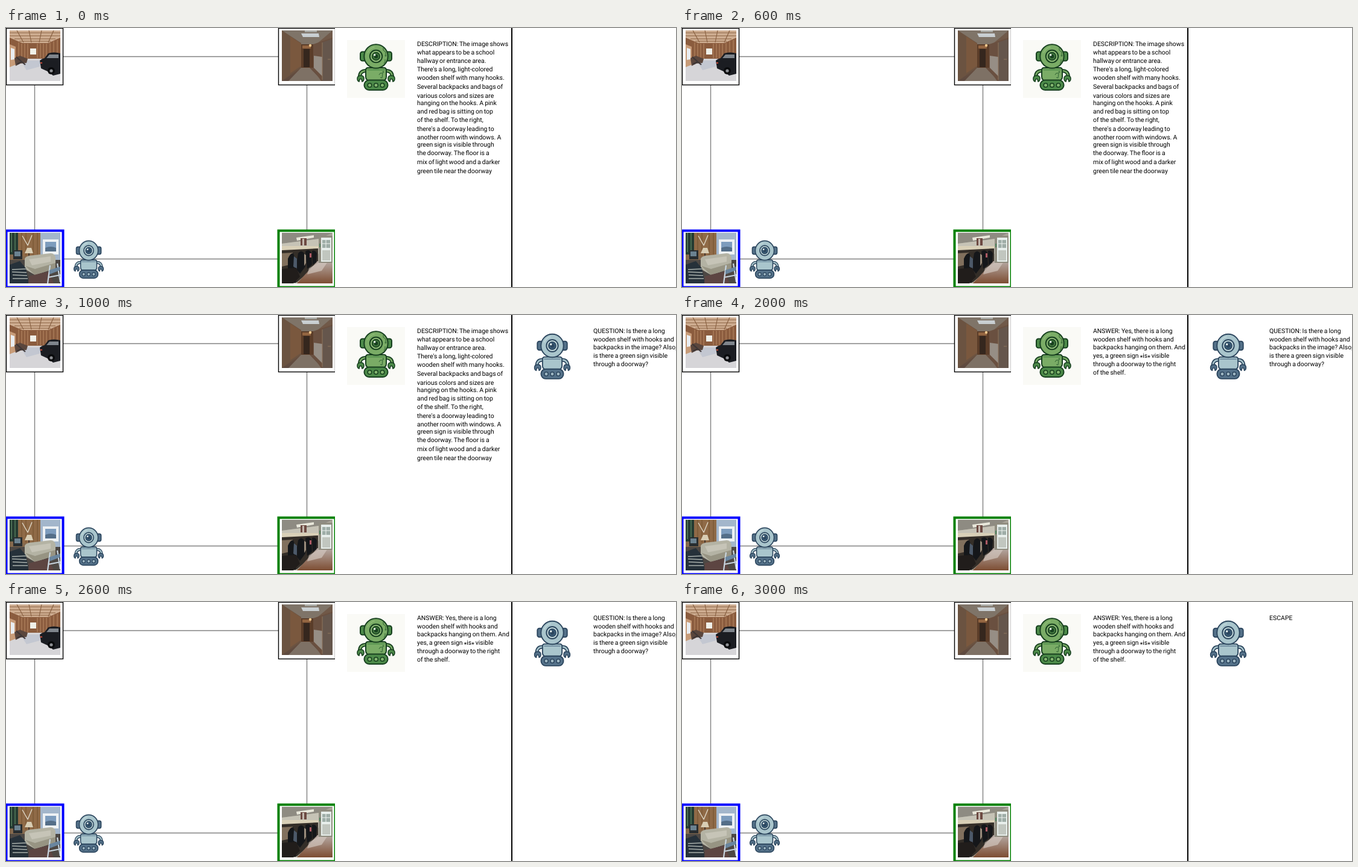
Animation, 1110 px wide and 430 px high, one loop 4 s. Source, as an HTML page:

```html
<!DOCTYPE html>
<html lang="en">
<head>
<meta charset="utf-8">
<title>Robot dialogue</title>
<style>
  html, body { margin: 0; width: 100%; height: 100%; overflow: hidden; background: #fff; }
  svg { display: block; }
  text { font: 10.5px Roboto, "Liberation Sans", sans-serif; word-spacing: -.6px; fill: #000; text-rendering: geometricPrecision; white-space: pre; }
  .blue { --line: #2c465e; --main: #a9c5cc; --soft: #c3d9dc; --limb: #55728a; --iris: #395a75; --dot: #9db6c2; }
  .green { --line: #17401f; --main: #7aac66; --soft: #8fbc78; --limb: #4c8a49; --iris: #40743d; --dot: #83b56f; }
</style>
</head>
<body>
<svg width="1110" height="430" viewBox="0 0 1110 430">
  <defs>
    <clipPath id="pic"><rect width="84" height="84"/></clipPath>
    <clipPath id="map"><rect width="545" height="430"/></clipPath>
    <filter id="soft" x="0" y="0" width="1" height="1"><feGaussianBlur stdDeviation=".7"/></filter>
    <linearGradient id="hall" x2="0" y2="1">
      <stop stop-color="#6f5b4d"/><stop offset=".5" stop-color="#74543d"/><stop offset="1" stop-color="#5d4a40"/>
    </linearGradient>
    <linearGradient id="floor" x2="0" y2="1">
      <stop stop-color="#b6aaa4"/><stop offset="1" stop-color="#7d4d33"/>
    </linearGradient>

    <!-- centred on the head -->
    <g id="robot" stroke="var(--line)" stroke-width="2" stroke-linejoin="round" stroke-linecap="round">
      <g id="arm">
        <path d="M-17 24q-9 0-10 9" fill="none" stroke-width="6"/>
        <path d="M-17 24q-9 0-10 9" fill="none" stroke="var(--main)" stroke-width="2.6"/>
        <path d="M-25 32q-6 0-6 5 0 4 3 5l1-4q2-1 3 0l1 4q3-1 3-5 0-5-5-5z" fill="var(--limb)" stroke-width="1.6"/>
      </g>
      <use href="#arm" transform="scale(-1 1)"/>
      <path d="M-13 19H13Q17 19 17 23V34Q17 40 11 40H-11Q-17 40-17 34V23Q-17 19-13 19z" fill="var(--main)"/>
      <path d="M-14 22.5H14" stroke="var(--limb)" stroke-width="1.3"/>
      <rect x="-19.5" y="39.5" width="39" height="16.5" rx="8" fill="var(--limb)"/>
      <g fill="var(--dot)" stroke-width="1.6">
        <circle cx="-10.5" cy="48" r="3.3"/><circle cy="48" r="3.3"/><circle cx="10.5" cy="48" r="3.3"/>
      </g>
      <rect x="-26" y="-7.5" width="10" height="15" rx="3.5" fill="var(--limb)"/>
      <rect x="16" y="-7.5" width="10" height="15" rx="3.5" fill="var(--limb)"/>
      <circle r="19.7" fill="var(--main)"/>
      <path d="M-14-6Q-10-14-3-15" fill="none" stroke="var(--soft)" stroke-width="1.6"/>
      <circle r="10.2" fill="var(--soft)"/>
      <circle r="6.4" fill="var(--iris)" stroke-width="1.6"/>
      <circle r="3.2" fill="var(--line)" stroke="none"/>
      <circle cx="-2.3" cy="-2.3" r="1.7" fill="#eef5f2" stroke="none"/>
    </g>

    <g id="garage">
      <path fill="#8b5c3e" d="M0 0H84V84H0z"/>
      <path fill="#cfae92" d="M0 0H84V12L64 21H21L0 12z"/>
      <path stroke="#8a6243" stroke-width="1.2" d="M0 4H84M0 9H84M8 14H76M16 18H68M12 0l11 20M32 0l4 20M53 0l-4 20M73 0l-9 20"/>
      <path stroke="#b98b67" d="M15 20V54M20 22V48M25 22V47M30 22V47M46 22V46M51 22V46M56 22V46M61 22V46M67 21V46M73 18V46M79 16V46"/>
      <path fill="#d6d5d8" d="M0 56L19 47H55L84 70V84H0z"/>
      <path fill="#c3c7d1" d="M18 50L52 50 50 60 28 66z"/>
      <path fill="#c79b78" d="M0 23L10 27V57L0 61z"/>
      <path fill="#e9edf1" d="M2 29L8 31V48L2 49z"/>
      <path fill="#f0f0e8" d="M34 30H44V40H34z"/>
      <path fill="#5a463d" d="M8 46L17 42 30 47 28 54 18 55 10 59z"/>
      <path fill="none" stroke="#3d3636" stroke-width="2" d="M11 44L20 52L26 57M12 56L20 52"/>
      <path fill="#1b1d22" d="M50 50Q53 47 58 46L64 38Q73 35 84 38V72L72 75 65 69 52 63z"/>
      <path fill="#7f858c" d="M61 46L66 40 81 40V46z"/>
      <circle cx="69" cy="67" r="6" fill="#090a0c"/><circle cx="69" cy="67" r="2.6" fill="#8d8f94"/>
      <path fill="#c64937" d="M51 53h3v2h-3z"/>
    </g>

    <g id="hallway">
      <path fill="url(#hall)" d="M0 0H84V84H0z"/>
      <path fill="#7f7468" d="M0 0H84L57 23H32z"/>
      <path fill="#c9cfd2" d="M32 5H61L62 11H35z"/>
      <path fill="#a8a9a4" d="M38 0H58V3H38z"/>
      <path fill="#6b5341" d="M0 0L32 21V62L0 84z"/>
      <path fill="#7a583e" d="M14 10L32 22V59L14 71z"/>
      <path fill="#5b3d29" d="M32 23H52V62H32z"/>
      <path fill="#936541" d="M34 25H48V30H34z"/>
      <path fill="#35271e" d="M36 31H46V61H36z"/>
      <path fill="#7e7165" d="M32 62H46L67 84H11z"/>
      <path fill="#6a5040" d="M52 23L84 12V84H65L52 65z"/>
      <path fill="#968e85" d="M53 42L67 44V76L53 62z"/>
      <path fill="#65564c" d="M67 20L84 14V84H67z"/>
      <path stroke="#8f745d" d="M67 20V82M76 48h5"/>
      <circle cx="47" cy="25" r="2.2" fill="#f1c88d"/>
    </g>

    <g id="lounge">
      <path fill="#84694e" d="M0 0H84V84H0z"/>
      <path fill="#253b32" d="M0 0H14V36H0z"/>
      <path stroke="#486b51" stroke-width="2" d="M3 0V32M9 0V32"/>
      <path fill="#8f6a47" d="M14 0H52V39H14z"/>
      <path stroke="#72502f" d="M20 0V38M27 0V38M39 0V38M46 0V38"/>
      <path fill="#a3b6cb" d="M51 0H84V51H51z"/>
      <path fill="#edf1f4" d="M55 11H81V36H55z"/>
      <path fill="#7d9cbd" d="M59 15H77V31H59z"/>
      <path fill="#546e88" d="M59 25q9-4 18 0v6H59z"/>
      <path fill="none" stroke="#ddd6c6" stroke-width="1.4" d="M21 5l9 16M37 4l-7 17"/>
      <path fill="#d8cdb4" d="M29 25h7l3 9H25z"/>
      <path stroke="#493b30" stroke-width="2" d="M32 34V42"/>
      <path fill="#282d30" d="M6 29H21V44H6z"/><path fill="#6b8290" d="M8 31H18V39H8z"/>
      <path fill="#4d4844" d="M0 45H84V84H0z"/>
      <path fill="#b4b3a4" d="M25 43Q27 39 33 38L68 34Q75 34 76 42V59L42 70 25 60z"/>
      <path fill="#c6c4b7" d="M32 44L68 39V48L37 54z"/>
      <path fill="#979483" d="M26 55L42 60 76 50V59L42 70z"/>
      <path fill="#26313a" d="M0 53L17 47 27 59 32 84H0z"/>
      <path stroke="#a9b0ac" stroke-width="1.5" d="M4 61L27 60M4 65L28 66M5 70L29 71M5 76L30 76"/>
      <path fill="#5d4542" d="M32 72L65 64 73 84H31z"/>
      <path fill="none" stroke="#c8d5df" stroke-width="2.2" d="M67 54L63 84M79 51L84 82M65 65L84 60M64 74L84 70"/>
      <path fill="#6a869f" d="M66 62L84 56V62L66 69z"/>
    </g>

    <g id="coats">
      <path fill="#aaa599" d="M0 0H84V84H0z"/>
      <path fill="#8e8b82" d="M0 0H84L62 10 0 18z"/>
      <path fill="#c6c3b6" d="M0 18L61 10V35L0 27z"/>
      <path fill="#e8e7da" d="M24 8L53 4V8L25 13z"/>
      <path fill="#6d4a42" d="M31 9h10v12H31z"/><path fill="#c5bab0" d="M34 10h3v11h-3z"/>
      <path fill="#d9d0b7" d="M0 22L62 22V26L0 30z"/>
      <path fill="#342e28" d="M0 29L60 26V52L25 82 0 84z"/>
      <path fill="#81705d" d="M0 34L18 33V52L0 56z"/>
      <path fill="url(#floor)" d="M25 84L59 47H84V84z"/>
      <path fill="#d6cbc4" d="M45 59L63 48H76L66 63 42 69z" opacity=".65"/>
      <path fill="#15171a" d="M10 43q4-10 9-9l7 21-3 28H10zM27 34q5-7 10 0l2 22-9 12-7-9zM39 31q6-5 10 2l1 20-8 7zM50 30q5-2 8 4l-1 15-6 4z"/>
      <path fill="#4c5969" d="M20 39l5 4v17l-6-4z"/><path fill="#9a8c7c" d="M37 35l3 2v13l-3 5z"/>
      <path fill="#ad5964" d="M46 34h3v7h-3z"/>
      <path fill="#908d80" d="M61 5H84V50H61z"/>
      <path fill="#e7eeeb" d="M65 8H82V48H65z"/>
      <path fill="#9eada7" d="M67 12H80V25H67z"/>
      <path stroke="#eff4f0" d="M73 11V26M67 18H80"/>
      <path fill="#c1c6bf" d="M67 29H80V46H67z"/>
      <path fill="#548763" d="M62 18h2v6h-2z"/>
      <path fill="#211d1b" d="M0 60L24 58 30 73 19 84H0z"/>
    </g>
  </defs>

  <rect width="1110" height="430" fill="#fff"/>
  <g clip-path="url(#map)">
    <path d="M47.5 47.5H498.5V383.5H47.5z" fill="none" stroke="#808080" stroke-width="1.4"/>
    <g id="rooms"></g>
    <use href="#robot" class="blue" transform="translate(137 369.5) scale(.79 .82)"/>
  </g>

  <rect x="565" y="20" width="96" height="96" fill="#fafaf6"/>
  <g class="green" transform="translate(613 47)">
    <use href="#robot"/>
    <g fill="none" stroke="#2f6333">
      <path d="M12-14v4l4 3v5M13 12l2-3v-4M5 31l2-3h4l-1 8M7 35l3 1"/>
      <circle cx="16" cy="-1" r="1"/><circle cx="12" cy="26" r="1"/>
    </g>
  </g>
  <rect x="837" width="2" height="430"/>
  <use id="asker" href="#robot" class="blue" transform="translate(905 51) scale(.95 .98)"/>
</svg>
<script>
const LOOP = 4000;
const svg = document.querySelector("svg");

function add(parent, tag, attrs) {
  const el = document.createElementNS("http://www.w3.org/2000/svg", tag);
  for (const key in attrs) el.setAttribute(key, attrs[key]);
  return parent.appendChild(el);
}

// A framed photo centred on a corner of the map.
function room(name, x, y, stroke, width) {
  const g = add(rooms, "g", { transform: `translate(${x} ${y})` });
  add(g, "rect", { x: -47, y: -47, width: 94, height: 94, fill: "#fff", stroke, "stroke-width": width });
  const photo = add(g, "g", { transform: "translate(-41.5 -43.5)", "clip-path": "url(#pic)" });
  add(photo, "use", { href: "#" + name, filter: "url(#soft)" });
}
room("garage", 47.5, 47.5, "#000", 1.4);
room("hallway", 497.5 + 1, 47.5, "#000", 1.4);
room("lounge", 47.5, 383.5, "#00f", 4);
room("coats", 498.5, 383.5, "#008000", 4);

// Lines are separated by "|"; asterisks sit at mid height.
function block(x, baselines, copy) {
  const group = add(svg, "g", {});
  copy.split("|").forEach((line, i) => {
    const text = add(group, "text", { x, y: baselines[i] });
    let low = 0;
    for (const part of line.split(/(\*)/)) {
      const drop = part === "*" ? 2.5 : 0;
      add(text, "tspan", { dy: drop - low }).textContent = part;
      low = drop;
    }
  });
  return group;
}

const short = [30, 44, 57, 71, 85, 99];
const long = [30, 44, 58, 72, 86, 101, 115.5, 128, 142, 156, 171, 185, 197, 211, 226, 241];

const description = block(681, long,
  "DESCRIPTION: The image shows|what appears to be a school|hallway or entrance area.|" +
  "There's a long, light-colored|wooden shelf with many hooks.|Several backpacks and bags of|" +
  "various colors and sizes are|hanging on the hooks. A pink|and red bag is sitting on top|" +
  "of the shelf. To the right,|there's a doorway leading to|another room with windows. A|" +
  "green sign is visible through|the doorway. The floor is a|mix of light wood and a darker|" +
  "green tile near the doorway");
const answer = block(681, short,
  "ANSWER: Yes, there is a long|wooden shelf with hooks and|backpacks hanging on them. And|" +
  "yes, a green sign *is* visible|through a doorway to the right|of the shelf.");
const question = block(973, short,
  "QUESTION: Is there a long|wooden shelf with hooks and|backpacks in the image? Also,|" +
  "is there a green sign visible|through a doorway?");
const farewell = block(973, short, "ESCAPE");

// element, shown from, shown until (ms)
const cues = [
  [description, 0, 2000],
  [answer, 2000, 4000],
  [asker, 1000, 4000],
  [question, 1000, 3000],
  [farewell, 3000, 4000]
];

function draw(now) {
  const t = now % LOOP;
  for (const [el, from, to] of cues) {
    el.style.visibility = t >= from && t < to ? "visible" : "hidden";
  }
}

const start = performance.now();
function tick() {
  draw(performance.now() - start);
  requestAnimationFrame(tick);
}
tick();
</script>
</body>
</html>
```
